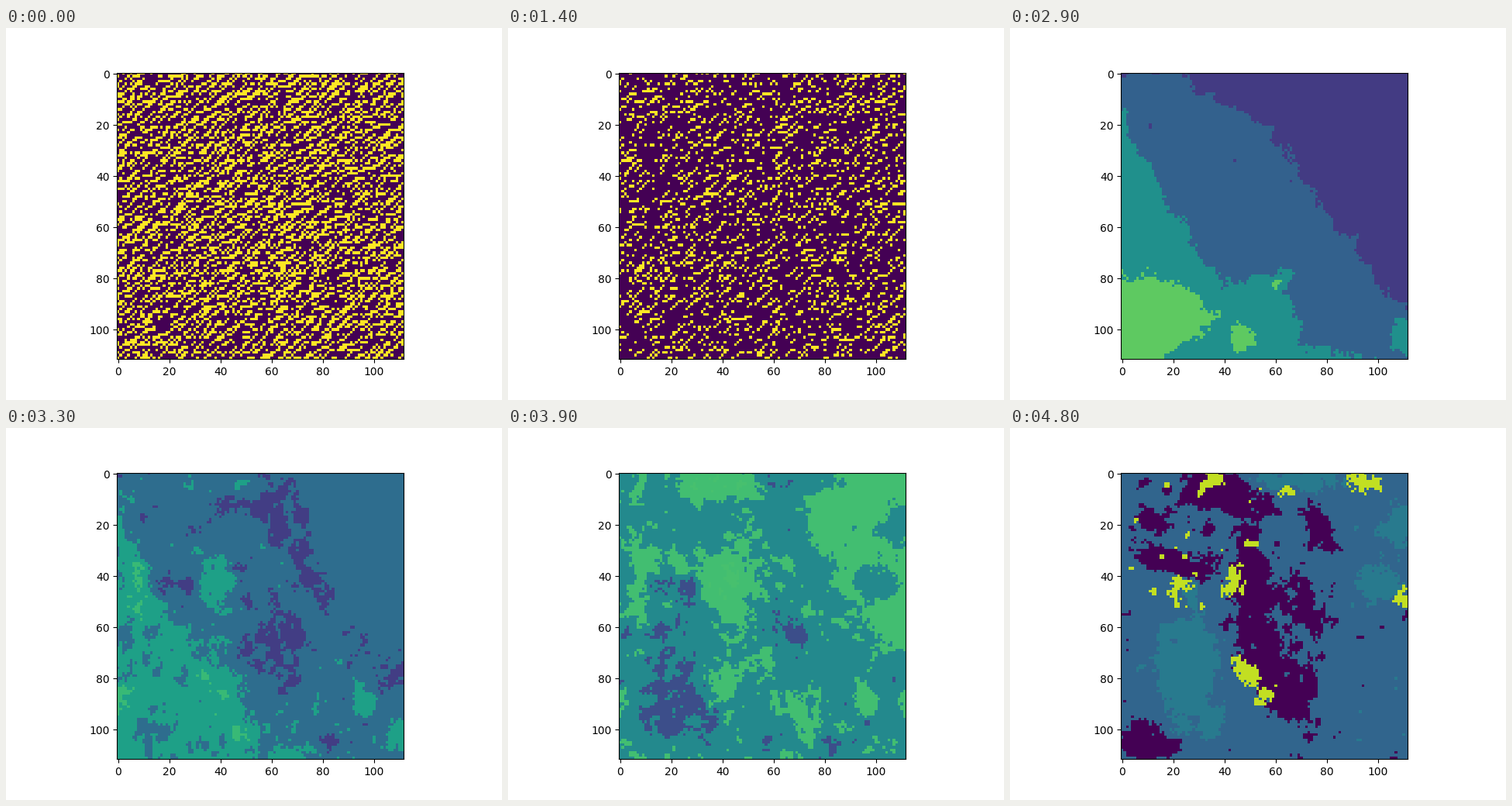
Write a matplotlib script that moves like this. It is 640 by 480 pixels and loops after 4.9 s.

```python
import numpy as np
import matplotlib.pyplot as plt
from matplotlib.animation import FuncAnimation

N, FRAMES, NOISY = 112, 49, 25
rng = np.random.default_rng(7)
Y, X = np.mgrid[0:N, 0:N].astype(float)


def smooth(size):
    """Periodic noise with unit spread and features of about `size` cells."""
    f = np.fft.fftfreq(N)
    low = np.exp(-2 * (np.pi * size) ** 2 * (f[:, None] ** 2 + f ** 2))
    g = np.fft.ifft2(np.fft.fft2(rng.normal(size=(N, N))) * low).real
    return g / g.std()


def mottle():
    """Noise with both fine and broad patches, unit spread."""
    g = sum(smooth(size) for size in (0.6, 1.2, 2.4, 4.8))
    return g / g.std()


# ragged coordinates, so that every outline frays a little
WX = X + 1.2 * smooth(2) + 0.8 * rng.normal(size=(N, N))
WY = Y + 1.2 * smooth(2) + 0.8 * rng.normal(size=(N, N))


def blobs(*rows):
    """Union of soft ellipses (cx, cy, rx, ry, degrees); 0.5 on each outline."""
    out = np.zeros((N, N))
    for cx, cy, rx, ry, deg in rows:
        z = (WX - cx + 1j * (WY - cy)) * np.exp(-1j * np.radians(deg))
        d2 = (z.real / rx) ** 2 + (z.imag / ry) ** 2
        out = np.maximum(out, 0.5 ** (d2 ** 2))
    return out


def step(d, width=1.5):
    return 1 / (1 + np.exp(-np.clip(d / width, -40, 40)))


def slope():
    """Bands rising towards the lower left corner."""
    blue = step(WY - np.interp(WX, [18, 60, 80, 111], [-3, 25, 55, 92]), 3)
    teal = step(WY - np.interp(WX, [0, 20, 40, 64, 70, 111], [16, 54, 81, 75, 108, 113]))
    wedge = np.minimum(0.75 * (38 - WX) - abs(WY - 94), WY - 80)
    green = np.maximum(step(wedge, 0.8), blobs((58, 82, 3, 3, 0), (47, 104, 4, 5, 0)))
    corner = blobs((110, 103, 4, 7, 0))
    return blue + np.maximum(teal, corner) + green + 0.13 * mottle()


def figure():
    """Bright sky on the right, mottled ground with light and dark patches."""
    sky = step(WX - np.interp(Y, [0, 50, 75], [72, 84, 118]), 3)
    light = blobs((41, 4, 18, 5, 0), (39, 42, 5, 14, 0), (36, 73, 10, 18, -25),
                  (7, 48, 3, 25, 0), (95, 90, 4, 8, 15))
    dark = blobs((21, 44, 8, 6, 0), (48, 42, 14, 2.5, 75), (66, 56, 16, 3, 50),
                 (13, 97, 9, 15, 15), (60, 82, 13, 25, 0), (84, 106, 8, 5, 0))
    return 1 + np.maximum(sky, light) - 0.75 * dark + 0.3 * (1 - sky) * mottle()


def strip():
    """Bright diagonal strip, a dark mass to its left and darker corners."""
    light = blobs((50, 42, 9, 20, -10), (60, 76, 28, 11, 60), (38, 8, 18, 8, 15),
                  (20, 34, 17, 6, 10), (79, 22, 14, 4, 60), (11, 105, 12, 6, 10))
    haze = blobs((69, 58, 12, 36, 0), (18, 14, 22, 14, 0))
    dark = blobs((25, 77, 11, 21, 0), (33, 95, 5, 10, -15), (27, 50, 3, 9, 0),
                 (68, 2, 18, 4, 0), (107, 20, 5, 9, 0), (100, 44, 10, 7, 35))
    return 1 + np.maximum(light, 0.45 * haze) - dark + 0.2 * mottle()


def spots():
    """Small highlights: a few large ones, plus noise peaks at the upper left."""
    main = blobs((49, 77, 7, 3, 55), (56, 87, 4, 2.5, 0), (43, 41, 2.5, 7, 15),
                 (22, 45, 2.5, 5, 0), (35, 2, 4, 3, 0), (64, 8, 2.5, 2.5, 0),
                 (94, 3, 7, 2.5, 20), (110, 46, 2, 4, 0))
    area = (X < 55) & (Y < 55)
    return (main > 0.5) | (area & (smooth(1.2) > 2))


BASE = strip()
CORE = blobs((46, 45, 5, 15, -5), (61, 82, 24, 6, 58))
NEGATIVE = np.where(spots(), 3, np.clip(BASE, 0, 2))

# frame index, level field, colormap positions of the four levels
SCENES = [
    (29, slope(), np.array([0.175, 0.31, 0.50, 0.75])),
    (36, figure(), np.array([0.19, 0.39, 0.62, 0.62])),
    (43, BASE + CORE, np.array([0.31, 0.58, 0.80, 0.83])),
    (48, NEGATIVE, np.array([0.41, 0.325, 0.0, 0.91])),
]
TIMES = [scene[0] for scene in SCENES]


def spikes(k):
    """Sparse cells with thin rising streaks, thinning over time."""
    n = np.random.default_rng(100 + k).normal(size=(N, N))
    density = 0.375 - 0.0129 * k

    def pair(dy, dx):
        return np.roll(n, (dy, dx), (0, 1)) + np.roll(n, (-dy, -dx), (0, 1))

    g = n + density * (1.3 * pair(-1, 1) + 0.5 * pair(0, 1) - pair(1, 0) - 0.6 * pair(1, 1))
    return (g > np.quantile(g, 1 - density)).astype(float)


def levels(k):
    """Blend neighbouring fields, keep their contrast, cut into flat levels."""
    pos = np.interp(k, TIMES, range(len(SCENES)))
    i = min(int(pos), len(SCENES) - 2)
    t = pos - i
    (_, fa, ca), (_, fb, cb) = SCENES[i:i + 2]
    field = 1 + ((1 - t) * (fa - 1) + t * (fb - 1)) / np.hypot(1 - t, t)
    colours = (1 - t) * ca + t * cb
    return colours[np.clip(np.rint(field), 0, 3).astype(int)]


def picture(k):
    return spikes(k) if k < NOISY else levels(k)


fig, ax = plt.subplots(figsize=(6.4, 4.8), dpi=100)
image = ax.imshow(picture(0), cmap="viridis", vmin=0, vmax=1)


def update(k):
    image.set_data(picture(k))
    return [image]


anim = FuncAnimation(fig, update, frames=FRAMES, interval=100, repeat=True, repeat_delay=0)
plt.show()
```
